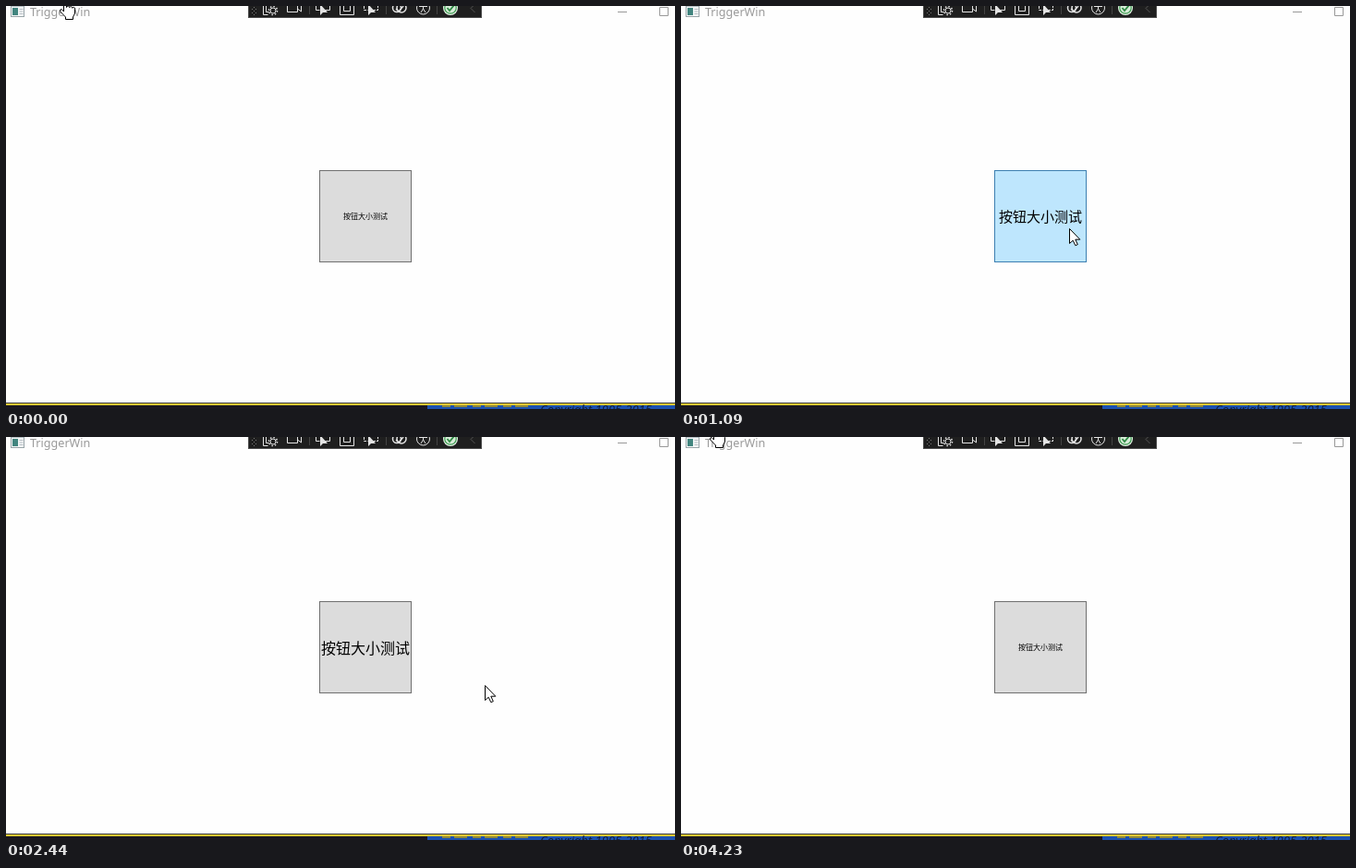
An HTML page that plays this animation: 724x437 px, repeating every 4320 ms.

```html
<!DOCTYPE html>
<html lang="en">
<head>
<meta charset="utf-8">
<title>Button size trigger</title>
<style>
  html, body { margin: 0; width: 100%; height: 100%; overflow: hidden; background: #fefefe; }
  #stage { position: relative; width: 724px; height: 437px; overflow: hidden; }
  svg { position: absolute; left: 0; top: 0; }
  text { font-family: "Noto Sans", sans-serif; }
  #button {
    position: absolute; left: 339px; top: 178px; width: 100px; height: 100px;
    box-sizing: border-box; padding: 0 1px 1px; overflow: hidden; display: flex;
    border: 1px solid #707070; background: #dcdcdc; color: #000;
  }
  #button.hot { background: #bee6fd; border-color: #3c7fb1; }
  /* Auto margins centre the label, and pin it left once it overflows. */
  #label {
    margin: auto; white-space: nowrap; line-height: 1; font-size: 8px;
    font-family: "Noto Sans CJK SC", "Noto Sans CJK", sans-serif;
  }
</style>
</head>
<body>
<div id="stage">
  <svg width="724" height="437" fill="none">
    <!-- title bar -->
    <rect x="5.5" y="-2.5" width="14" height="14" fill="#f4f7f7" stroke="#98a4a8"/>
    <path d="M6 0H19" stroke="#b8c2c6" stroke-width="2"/>
    <rect x="7" y="2" width="6" height="8" fill="#42857f"/>
    <path d="M14.5 3.5h4M14.5 6h4M14.5 8.5h4" stroke="#b6bdc4"/>
    <text x="26" y="11" fill="#999" font-size="12.6">TriggerWin</text>
    <path d="M662 6.5h10M707.5 1.5h9v9h-9z" stroke="#999"/>

    <!-- debug toolbar -->
    <defs>
      <pattern id="grip" width="4" height="4" patternUnits="userSpaceOnUse">
        <path d="M0 1.5h1M2 3.5h1" stroke="#777"/>
      </pattern>
      <path id="pointer" d="M0-2v12l3-3h5z" fill="#e4e4e4"/>
    </defs>
    <rect x="262.5" y="-2.5" width="252" height="15" fill="#1f1f1f" stroke="#4d4d4d"/>
    <rect x="266" width="6" height="11" fill="url(#grip)"/>
    <path d="M328.5 0v9M411.5 0v9M466.5 0v9" stroke="#444"/>
    <g stroke="#e4e4e4">
      <path d="M278.5 0v9.5h5M281.5 0v6.5h3"/>
      <circle cx="289" cy="5" r="3"/>
      <circle cx="289" cy="5" r="4.5" stroke-width="1.6" stroke-dasharray="1.5 2"/>
      <path d="M304.5 0v6.5h11V0M315.5 3l4 3V0"/>
      <path d="M335.5 0v4.5h4M345 4.5h5.5V0"/>
      <path d="M361.5 0v9.5h15V0M365.5 0v5.5h7V0"/>
      <path d="M387.5 0v4.5h4M397 4.5h5.5V0" stroke-dasharray="3 1"/>
      <g stroke-width="1.5">
        <circle cx="423" cy="2" r="4.5"/>
        <circle cx="428" cy="2" r="5"/>
        <path d="M422 3l3 3 5-6"/>
      </g>
      <circle cx="451.5" cy="2" r="7"/>
      <path d="M447 .5h9M451.5 0v3l-2.5 4M451.5 3l2.5 4"/>
    </g>
    <use href="#pointer" x="340"/>
    <use href="#pointer" x="392"/>
    <circle cx="481" cy="2" r="8" fill="#e5f2e5"/>
    <circle cx="481" cy="2" r="6.2" fill="#d8ecd8" stroke="#3c9a50" stroke-width="1.2"/>
    <path d="M477.5 2l2.5 3 5-6" stroke="#2f8a44" stroke-width="1.8"/>
    <path d="M507.5-2l-4.5 4.5 4.5 4.5" stroke="#555"/>

    <!-- windows behind the bottom edge -->
    <rect y="430" width="724" height="7" fill="#3c3c3c"/>
    <rect y="431" width="724" height="2" fill="#e4c833"/>
    <rect y="433" width="456" height="4" fill="#1b181f"/>
    <rect x="456" y="433" width="268" height="4" fill="#1c52b0"/>
    <path d="M472 434H568" stroke="#8f8a3c" stroke-width="2" stroke-dasharray="9 4 14 6"/>
    <text x="578" y="442" fill="#10203f" font-size="13" font-style="italic">Copyright 1995-2015</text>
  </svg>

  <div id="button"><span id="label">按钮大小测试</span></div>

  <svg width="724" height="437">
    <g id="cursor" fill="#fff" stroke="#000" stroke-linejoin="round">
      <path id="arrow" d="M.5 .5V16.5L4.2 13.2 6.8 18.7 9.3 17.6 6.8 12.2H11.8z"/>
      <path id="hand" d="M-.5 13V2.5a1.5 1.5 0 0 1 3 0V8.5a1.6 1.6 0 0 1 3.2 .2a1.6 1.6 0 0 1 3.1 .6a1.4 1.4 0 0 1 2.7 1V15L9.5 19V21.5H1.5V19L-4.3 13q-.8-2.6 1.6-2.4z"/>
    </g>
  </svg>
</div>
<script>
  const LOOP = 4320, TICK = 90;
  const SMALL = 8, LARGE = 20;
  const home = { x: 63, y: -7 };
  // Pointer journeys; a higher lift makes the path rise before it moves across.
  const journeys = [
    { start: 0, end: 540, x: 420, y: 241, lift: 2 },
    { start: 2028, end: 2607, x: 528, y: 272, lift: 2 },
    { start: 3240, end: 4230, x: 36, y: -10, lift: 4 }
  ];
  const [button, label, cursor, arrow, hand] =
    ["button", "label", "cursor", "arrow", "hand"].map(id => document.getElementById(id));

  const progress = (time, start, end) => Math.min(1, Math.max(0, (time - start) / (end - start)));
  const easeOut = (p, power) => 1 - (1 - p) ** power;
  const mix = (a, b, p) => a + (b - a) * p;

  function pointerAt(time) {
    return journeys.reduce((from, { start, end, x, y, lift }) => {
      const p = progress(time, start, end);
      return { x: mix(from.x, x, easeOut(p, 2)), y: mix(from.y, y, easeOut(p, lift)) };
    }, home);
  }

  function sizeAt(time) {
    return mix(SMALL, LARGE, progress(time, 340, 1600) - progress(time, 2130, 3030));
  }

  function draw(now) {
    const time = Math.floor(now % LOOP / TICK) * TICK;
    const { x, y } = pointerAt(time);
    const onTitle = y < 0;
    const onButton = x >= 339 && x < 439 && y >= 178 && y < 278;

    cursor.setAttribute("transform", `translate(${Math.round(x)} ${Math.round(y)})`);
    hand.style.display = onTitle ? "" : "none";
    arrow.style.display = onTitle ? "none" : "";
    button.classList.toggle("hot", onButton);
    label.style.fontSize = sizeAt(time) + "px";
  }

  let began;
  function frame(now) {
    began ??= now;
    draw(now - began);
    requestAnimationFrame(frame);
  }
  requestAnimationFrame(frame);
</script>
</body>
</html>
```
